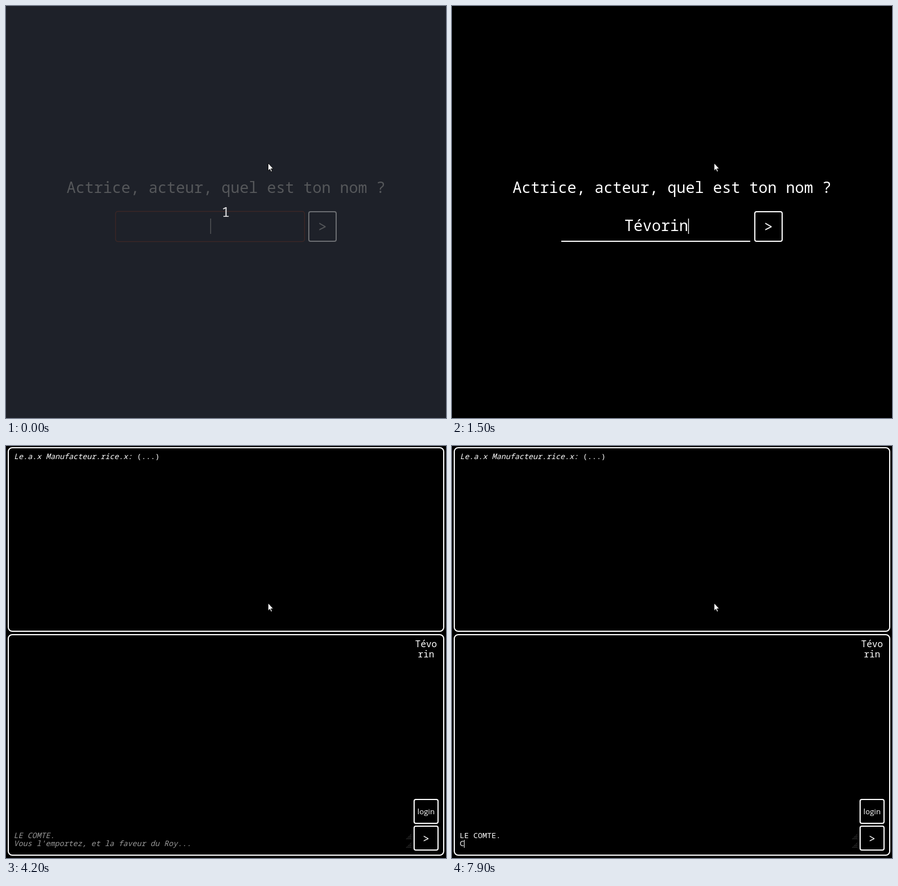
An HTML page that plays this animation: 773 by 725 pixels, repeating every 8000 ms.

```html
<!DOCTYPE html>
<html lang="fr">
<head>
<meta charset="utf-8">
<title>Dialogue</title>
<style>
  html, body { margin: 0; width: 100%; height: 100%; overflow: hidden; background: #000; }
  svg {
    --ink: #fff; --edge: #fff; --alert: #7c0a0c;
    display: block; width: 773px; height: 725px; background: #000;
    font-family: "Noto Sans Mono", "DejaVu Sans Mono", monospace;
  }
  svg.dim { --ink: #55575a; --edge: #6b6d71; --alert: #3b2726; background: #1e2129; }
  text { fill: var(--ink); white-space: pre; }
  .big { font-size: 26.667px; }
  .small { font-size: 13.333px; }
  .mid { text-anchor: middle; }
  .hint { fill: #999; font-style: italic; }
  .sans { font-family: "Open Sans", "Noto Sans", sans-serif; }
  .frame { fill: none; stroke: var(--edge); stroke-width: 2; }
  .caret { fill: var(--ink); }
  .grip { stroke: #555; stroke-width: 1; stroke-dasharray: 1 1; fill: none; }
  [hidden] { display: none; }
</style>
</head>
<body>
<svg id="stage" viewBox="0 0 773 725">
  <g id="ask">
    <text class="big mid" x="386.5" y="329">Actrice, acteur, quel est ton nom ?</text>
    <rect id="invalid" x="192.5" y="361.5" width="332" height="53" rx="4" fill="none" stroke="var(--alert)" stroke-width="1.5"/>
    <rect id="underline" x="192" y="413" width="332" height="2" fill="#fff"/>
    <text id="field" class="big mid" x="359" y="396"></text>
    <rect id="fieldCaret" class="caret" y="374" width="1.4" height="27"/>
    <rect class="frame" x="532" y="362" width="48" height="52" rx="3"/>
    <text class="big mid" x="556" y="398">&gt;</text>
    <text id="count" class="mid" x="386" y="371" font-size="24" style="fill:#e2e2e3">1</text>
    <g id="status">
      <path id="bubble" fill="#f2f1ee" stroke="#b5b3ad"/>
      <svg id="clip" x="0" y="707" height="18">
        <text class="sans" x="2.5" y="15" font-size="12" style="fill:#3c3c3c">Waiting for chatbot.manufacture-recherche.ch…</text>
      </svg>
    </g>
  </g>

  <g id="chat">
    <rect class="frame" x="4" y="3" width="765" height="323" rx="7"/>
    <rect class="frame" x="4" y="332" width="765" height="388" rx="7"/>
    <text class="small" x="14" y="23"><tspan font-style="italic">Le.a.x Manufacteur.rice.x:</tspan> (...)</text>
    <text id="nameTop" class="mid" x="738" y="354" font-size="16"></text>
    <text id="nameEnd" class="mid" x="738" y="371.5" font-size="16"></text>
    <rect class="frame" x="717" y="622" width="42" height="42" rx="3"/>
    <text class="sans small mid" x="738" y="647.5">login</text>
    <rect class="frame" x="717" y="669" width="42" height="42" rx="3"/>
    <text class="mid" x="738" y="698" font-size="20">&gt;</text>
    <text id="line0" class="small" x="13.5" y="690"></text>
    <text id="line1" class="small" x="13.5" y="704"></text>
    <rect id="chatCaret" class="caret" width="1" height="14"/>
    <path class="grip" d="M703 692l9-9M705 692l7-7M707 692l5-5M709 692l3-3M711 692l1-1"/>
    <path class="grip" d="M703 707l9-9M705 707l7-7M707 707l5-5M709 707l3-3M711 707l1-1"/>
  </g>

  <path d="M460.5 276.5v13.4l3-2.8 2.1 4.6 2-.9-2-4.5h4z" fill="#fff" stroke="#000" stroke-width=".9"/>
</svg>
<script>
  const LOOP = 8000;
  const NAME = "Tévorin";
  const HINTS = ["LE COMTE.", "Vous l'emportez, et la faveur du Roy..."];
  const TYPED = ["LE COMTE.", "C"];

  // Moment at which each count of typed characters is reached.
  const nameKeys = [500, 800, 1000, 1200, 1300, 1400, 1500];
  const lineKeys = [[4800, 4900, 5100, 5400, 5500, 5600, 5800, 5900, 5900], [7900]];

  // Caret spans in the chat: from, to, line.
  const caretSpans = [[2200, 3100, 1], [3100, 4200, 0], [4800, 6600, 0], [7500, 8000, 1]];

  const $ = id => document.getElementById(id);
  const show = (id, on) => $(id).toggleAttribute("hidden", !on);
  const reached = (keys, t) => keys.filter(k => t >= k).length;
  const put = (id, text) => {
    if ($(id).textContent !== text) $(id).textContent = text;
  };

  put("nameTop", NAME.slice(0, 4));
  put("nameEnd", NAME.slice(4));

  function drawAsk(t) {
    const n = reached(nameKeys, t);
    $("stage").classList.toggle("dim", t < 300);
    show("count", t < 300);
    show("invalid", t < 500);
    show("underline", t >= 500);
    put("field", NAME.slice(0, n));
    $("fieldCaret").setAttribute("x", 358.8 + 8 * n);
    show("fieldCaret", t < 300 || (t >= 500 && t < 2000));

    const w = t < 2000 ? 268 : 275;
    show("status", t >= 1800);
    $("bubble").setAttribute("d", `M-1 707.5H${w - 3.5}q3 0 3 3V726H-1z`);
    $("clip").setAttribute("width", w - 1);
  }

  function drawChat(t) {
    const counts = lineKeys.map(keys => reached(keys, t));
    counts.forEach((n, i) => {
      put("line" + i, n ? TYPED[i].slice(0, n) : HINTS[i]);
      $("line" + i).classList.toggle("hint", !n);
    });
    const span = caretSpans.find(([from, to]) => t >= from && t < to);
    show("chatCaret", span);
    if (span) {
      const line = span[2];
      $("chatCaret").setAttribute("x", Math.round(13 + 8.07 * counts[line]));
      $("chatCaret").setAttribute("y", 679 + 14 * line);
    }
  }

  function draw(now) {
    const t = now % LOOP;
    const chatting = t >= 2100;
    show("ask", !chatting);
    show("chat", chatting);
    if (chatting) {
      $("stage").classList.remove("dim");
      drawChat(t);
    } else {
      drawAsk(t);
    }
  }

  const start = performance.now();
  function tick() {
    draw(performance.now() - start);
    requestAnimationFrame(tick);
  }
  tick();
</script>
</body>
</html>
```
